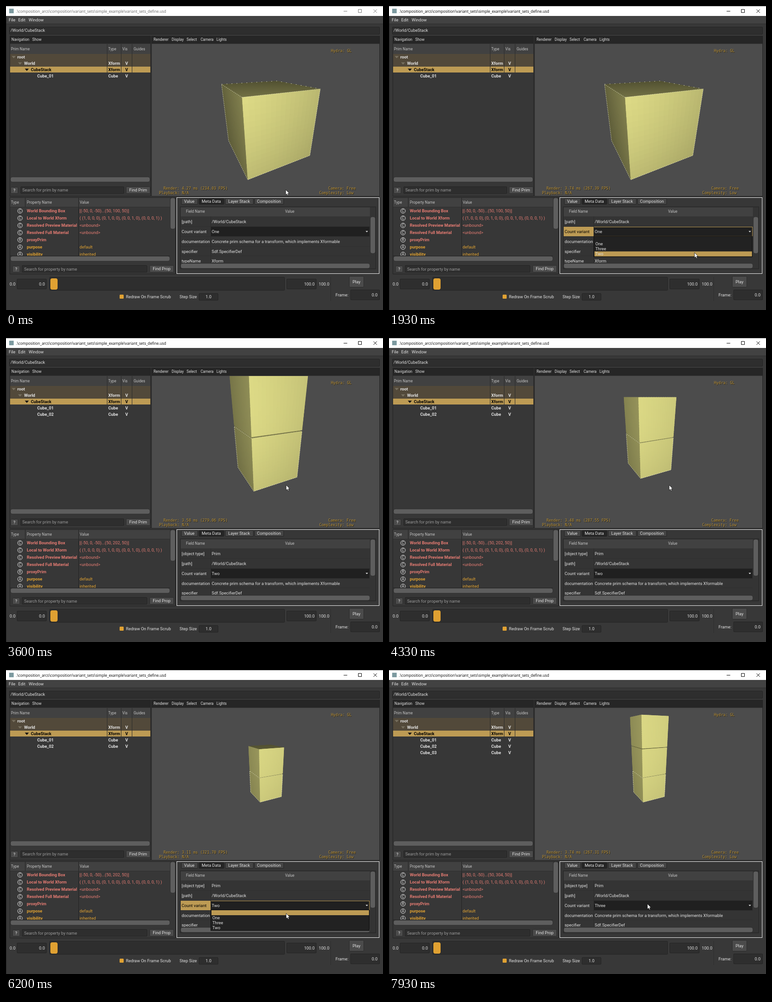
Write an HTML page with a canvas that moves like this. It is 833 by 672 pixels and loops after 8000 ms.

```html
<!DOCTYPE html>
<html lang="en">
<head>
<meta charset="utf-8">
<title>Variant sets</title>
<style>
  html, body { margin: 0; width: 833px; height: 672px; overflow: hidden; background: #383838; }
  svg, canvas { position: absolute; left: 0; top: 0; }
  canvas { left: 322px; top: 84px; }
  text { font: 9.3px Roboto, sans-serif; fill: #e3e3e3; white-space: pre; }
  .small { font-size: 8.25px; }
  .head { font-size: 8.25px; fill: #c4c4c4; }
  .bold { font-weight: 700; }
  .dim { fill: #9a9a9a; }
  .red { fill: #e67c73; }
  .gold { fill: #dfa131; }
  .black { fill: #000; }
  .hud { font: 8.42px "DejaVu Sans Mono", monospace; fill: #bf963c; }
  .shade { fill: #1d1a10; }
  .title { font: 8.3px "Open Sans", sans-serif; fill: #000; }
  .inactive { fill: #666; }
</style>
</head>
<body>
<svg id="base" width="833" height="672"></svg>
<canvas id="view" width="503" height="336"></canvas>
<svg id="live" width="833" height="672"></svg>
<script>
const TICK = 1000 / 15, TICKS = 120;
const GOLD = '#bd9b54', FIELD = '#2e2e2e', DARK = '#262626', LINE = '#222';

// ---------- SVG helpers ----------
const rect = (x, y, w, h, fill, rx = 0, extra = '') =>
  `<rect x="${x}" y="${y}" width="${w}" height="${h}" fill="${fill}" rx="${rx}" ${extra}/>`;
const path = (d, stroke, width = 1, fill = 'none') =>
  `<path d="${d}" stroke="${stroke}" stroke-width="${width}" fill="${fill}"/>`;
// y is the vertical middle of the line of text
const text = (x, y, s, cls = '', anchor = 'start') =>
  `<text x="${x}" y="${y + 3.3}" class="${cls}" text-anchor="${anchor}">${s}</text>`;
const field = (x, y, w, h) => rect(x + .5, y + .5, w - 1, h - 1, FIELD, 1.5, 'stroke="#242424"');
const button = (x, y, w, h, s) =>
  rect(x + .5, y + .5, w - 1, h - 1, '#4b4b4b', 2, 'stroke="#2a2a2a"') + text(x + w / 2, y + h / 2, s, '', 'middle');
const bar = (x, y, w, h) => rect(x, y, w, h, '#5e5e5e', 4, 'stroke="#2b2b2b" stroke-width=".8"');
const panel = (x, y, w, h, stroke = LINE) => rect(x + .5, y + .5, w - 1, h - 1, '#373737', 0, `stroke="${stroke}"`);
const vline = (x, y0, y1, color = LINE) => path(`M${x + .5} ${y0}V${y1}`, color);
const hline = (x0, x1, y, color = LINE) => path(`M${x0} ${y + .5}H${x1}`, color);
const labels = (y, cls, pairs) => pairs.map(([x, s]) => text(x, y, s, cls)).join('');

function drawBase() {
  const parts = [
    rect(0, 0, 833, 672, '#383838'),
    rect(0, 0, 833, 22, '#fff'), rect(0, 0, 833, 1, '#8a8a8a'),
    rect(7, 6, 10, 10, '#7d9aa0'),
    rect(0, 22, 833, 18, '#424242'), hline(0, 833, 39, '#2c2c2c'),
    labels(31, '', [[6, 'File'], [27, 'Edit'], [50, 'Window']]),
    field(7, 46, 819, 17), text(10, 54, '/World/CubeStack'),

    // prim browser
    panel(8, 66, 312, 355), rect(9, 67, 310, 16, DARK),
    labels(73.5, 'small', [[12, 'Navigation'], [58, 'Show']]),
    rect(9, 84, 310, 22, '#414141'),
    labels(95, 'head', [[11, 'Prim Name'], [226, 'Type'], [257, 'Vis'], [282, 'Guides']]),
    rect(9, 106, 310, 28, '#52493a'), rect(9, 134, 310, 13, GOLD),
    [223, 254, 278].map(x => vline(x, 84, 147, '#2b2b2b')).join(''),
    [[17, 113], [31, 127], [46, 141]].map(([x, y], i) =>
      path(`M${x - 4.5} ${y - 2.5}h9l-4.5 5z`, 'none', 0, i < 2 ? '#77705f' : '#111')).join(''),
    text(25, 113, 'root', 'bold'), text(40, 127, 'World', 'bold'), text(55, 141, 'CubeStack', 'bold black'),
    text(226, 127, 'Xform', 'bold'), text(226, 141, 'Xform', 'bold black'),
    text(263.5, 127, 'V', 'bold'), text(263.5, 141, 'V', 'bold black'),
    bar(10, 378, 308, 11),
    button(10, 400, 17, 15, '?'), field(32, 399, 229, 16), text(36, 407, 'Search for prim by name', 'dim'),
    button(265, 399, 54, 16, 'Find Prim'),

    // viewport frame
    panel(321, 66, 505, 355), rect(322, 67, 503, 16, DARK),
    labels(73.5, 'small', [[326, 'Renderer'], [366, 'Display'], [399, 'Select'], [430, 'Camera'], [465, 'Lights']]),

    // property browser
    panel(8, 423, 367, 170), rect(9, 424, 353, 20, '#414141'),
    labels(433.5, 'head', [[11, 'Type'], [46, 'Property Name'], [163, 'Value']]),
    vline(42, 424, 444), vline(160, 424, 552), hline(9, 362, 444, '#2e2e2e'),
    '<clipPath id="props"><rect x="9" y="445" width="353" height="107"/></clipPath><g clip-path="url(#props)">',
    [['C', 'World Bounding Box', ''], ['C', 'Local to World Xform', '( (1, 0, 0, 0), (0, 1, 0, 0), (0, 0, 1, 0), (0, 0, 0, 1) )'],
     ['C', 'Resolved Preview Material', '&lt;unbound&gt;'], ['C', 'Resolved Full Material', '&lt;unbound&gt;'],
     ['R', 'proxyPrim', ''], ['A', 'purpose', 'default'], ['A', 'visibility', 'inherited']].map(([kind, name, value], i) => {
      const y = 453 + 16 * i, color = kind === 'A' ? 'gold' : 'red';
      return `<circle cx="31" cy="${y}" r="5.2" fill="none" stroke="#ddd"/>` + text(31, y - .3, kind, 'small', 'middle')
        + text(46, y, name, 'bold ' + color) + text(162.5, y, value, color);
    }).join(''), '</g>',
    bar(10, 553, 352, 11), bar(363, 424, 11, 69), hline(9, 362, 552),
    button(14, 574, 17, 15, '?'), field(35, 573, 277, 16), text(40, 581.5, 'Search for property by name', 'dim'),
    button(317, 573, 54, 16, 'Find Prop'),

    // metadata panel
    panel(377, 423, 448, 169, '#f2f2f2'),
    [[387, 36, 'Value'], [426, 55, 'Meta Data'], [484, 62, 'Layer Stack'], [549, 64, 'Composition']].map(([x, w, s]) =>
      rect(x + .5, 425.5, w, 13, s === 'Meta Data' ? '#252525' : '#454545', 1.5, 'stroke="#242424"')
      + text(x + w / 2, 432, s, '', 'middle')).join(''),
    rect(385, 444, 432, 137, '#343434', 0, `stroke="${LINE}"`), rect(386, 445, 418, 20, '#414141'),
    text(418.5, 454, 'Field Name', 'head', 'middle'), text(627, 454, 'Value', 'head', 'middle'),
    bar(386, 569, 418, 11),

    // timeline
    text(8, 614.5, '0.0'), field(24, 603, 66, 23), text(86, 614.5, '0.0', '', 'end'),
    field(96, 599, 520, 30), rect(97.5, 601.5, 17, 26, '#e0a132', 4.5, 'stroke="#2a2a2a"'),
    field(620, 603, 66, 23), text(682, 614.5, '100.0', '', 'end'), text(691, 614.5, '100.0'),
    vline(717, 599, 652, '#2f2f2f'),
    button(758, 597, 33, 25, 'Play'), text(728, 638.5, 'Frame:'), field(761, 627, 65, 23), text(821, 638.5, '0.0', '', 'end'),
    rect(251, 638, 9, 9, '#e0a132', 1.5), text(265, 643, 'Redraw On Frame Scrub'),
    text(383.5, 643, 'Step Size'), field(426, 635, 43, 16), text(447.5, 643, '1.0', '', 'middle'),
    vline(0, 22, 672, '#222')
  ];
  document.getElementById('base').innerHTML = parts.join('');
}

// ---------- timeline, in ticks ----------
const cursorKeys = [[0, 618, 406], [9, 718, 502], [20, 718, 502], [29, 675, 545], [42, 675, 545], [48, 619, 325],
  [72, 619, 325], [79, 619, 538], [82, 619, 522], [87, 619, 522], [93, 619, 538], [97, 571, 556],
  [114, 571, 556], [119, 571, 517]];
const zoomTicks = [50, 52, 53, 55, 56, 65, 66, 67, 68];
const fpsKeys = [[0, 234.03], [15, 267.39], [38, 260.5], [50, 258.12], [52, 271.44], [53, 279.06], [55, 264.9],
  [56, 282.37], [65, 287.55], [66, 301.2], [67, 294.63], [68, 321.7], [105, 267.31]];

function cursorAt(tick) {
  const i = Math.max(1, cursorKeys.findIndex(k => k[0] >= tick));
  const [t0, x0, y0] = cursorKeys[i - 1], [t1, x1, y1] = cursorKeys[i];
  const u = (tick - t0) / (t1 - t0), e = u * u * (3 - 2 * u);
  return { x: Math.round(x0 + (x1 - x0) * e), y: Math.round(y0 + (y1 - y0) * e) };
}

function stateAt(tick) {
  return {
    count: tick < 38 ? 1 : tick < 105 ? 2 : 3,
    fps: fpsKeys.filter(k => k[0] <= tick).pop()[1],
    cursor: cursorAt(tick),
    active: tick >= 15,
    distance: 201 * 1.12 ** zoomTicks.filter(t => t <= tick).length,
    focused: tick >= 15 && tick < 38 || tick >= 88 && tick < 105,
    open: tick >= 16 && tick < 38 || tick >= 88 && tick < 105
  };
}

// ---------- viewport ----------
const ctx = document.getElementById('view').getContext('2d');
const FOCAL = 291, SIN = Math.sin(Math.PI / 8), COS = Math.cos(Math.PI / 8);
const corner = deg => [70.71 * Math.sin(deg * Math.PI / 180), 70.71 * Math.cos(deg * Math.PI / 180)];
const [front, right, left, back] = [-17.6, 72.4, -107.6, 162.4].map(corner);

function drawView({ count, distance }) {
  const eye = [0, 50 + distance * SIN, distance * COS];
  const project = ([x, y, z]) => {
    const h = y - 50, depth = distance - z * COS - h * SIN;
    return [251.5 + FOCAL * x / depth, 167.5 - FOCAL * (h * COS - z * SIN) / depth];
  };
  const trace = points => {
    ctx.beginPath();
    points.forEach(p => ctx.lineTo(...project(p)));
  };
  const at = ([x, z], y) => [x, y, z];

  // shaded by a light at the eye, in small patches that overlap inside the clipped face
  function face(o, a, b, normal) {
    const n = 16;
    const point = (u, v) => o.map((c, i) => c + (a[i] - c) * u / n + (b[i] - c) * v / n);
    const quad = (u, v, size) => {
      trace([point(u, v), point(u + size, v), point(u + size, v + size), point(u, v + size)]);
      ctx.closePath();
    };
    ctx.save();
    quad(0, 0, n);
    ctx.clip();
    for (let u = 0; u < n; u++) for (let v = 0; v < n; v++) {
      const ray = point(u + .5, v + .5).map((c, i) => eye[i] - c);
      const lit = ray.reduce((s, c, i) => s + c * normal[i], 0) / Math.hypot(...ray);
      const k = Math.max(0, lit) ** (1 / 2.2);
      quad(u, v, 1);
      ctx.fillStyle = ctx.strokeStyle = `rgb(${228 * k},${225 * k},${138 * k})`;
      ctx.fill();
      ctx.stroke();
    }
    ctx.restore();
  }
  const side = (p, y0, y1) => face(at(front, y0), at(p, y0), at(front, y1),
    [(front[0] + p[0]) / 100, 0, (front[1] + p[1]) / 100]);

  ctx.setLineDash([]);
  ctx.lineWidth = 2;
  ctx.lineJoin = 'round';
  ctx.fillStyle = '#4c4c4c';
  ctx.fillRect(0, 0, 503, 336);
  for (let i = 0; i < count; i++) {
    const y0 = 102 * i, y1 = y0 + 100;
    if (eye[1] > y1) face(at(front, y1), at(right, y1), at(left, y1), [0, 1, 0]);
    side(left, y0, y1);
    side(right, y0, y1);
  }

  const dashed = (points, alpha, dash = [2, 2]) => {
    trace(points);
    ctx.setLineDash(dash);
    ctx.lineWidth = 1;
    ctx.strokeStyle = `rgba(255,255,225,${alpha})`;
    ctx.stroke();
  };
  dashed([at(front, 100), at(left, 100), at(left, 0), at(front, 0), at(right, 0), at(right, 100)], .7);
  dashed([at(front, 100), at(right, 100)], count > 1 ? .2 : .5);
  if (count === 1) dashed([at(left, 100), at(back, 100), at(right, 100)], .7, [2, 9]);
}

// ---------- changing parts of the interface ----------
function titleBar(active) {
  const name = '.\\composition_arcs\\composition\\variant_sets\\simple_example\\variant_sets_define.usd';
  return text(22, 11.3, name, active ? 'title' : 'title inactive')
    + path('M746 11.5h8M778.5 7.5h7v7h-7zM812 7.5l7.5 7.5M819.5 7.5l-7.5 7.5', active ? '#000' : '#777');
}

function hud(fps) {
  const lines = [[718, 99, 'Hydra: GL'], [348, 402.5, `Render: ${(1000 / fps).toFixed(2)} ms (${fps.toFixed(2)} FPS)`],
    [338, 413, 'Playback: N/A'], [712, 402.5, 'Camera: Free'], [692, 413, 'Complexity: Low']];
  return lines.map(([x, y, s]) => text(x + .8, y + .8, s, 'hud shade') + text(x, y, s, 'hud')).join('');
}

function metadata({ count, focused }) {
  const variant = ['One', 'Two', 'Three'][count - 1], scrolled = count === 1;
  const rows = [['[object type]', 'Prim'], ['[path]', '/World/CubeStack'], ['Count variant', variant],
    ['documentation', 'Concrete prim schema for a transform, which implements Xformable'],
    ['specifier', 'Sdf.SpecifierDef'], ['typeName', 'Xform']].slice(scrolled ? 1 : 0);
  const body = rows.map(([name, value], i) => {
    const y = 477 + 21.75 * i, top = Math.round(y - 11), combo = name === 'Count variant';
    const lit = combo && focused;
    return (lit ? rect(386, top, 66, 22, GOLD) : '')
      + (combo ? rect(453, top, 350, 21, '#202020') + path(`M794.5 ${y - 1.5}h5.5l-2.75 3z`, 'none', 0, '#ddd') : '')
      + (lit ? rect(452.5, top + .5, 350.5, 20.5, 'none', 0, `stroke="${GOLD}"`) : '')
      + text(388, y, name, lit ? 'black' : '') + text(454.5, y, value)
      + hline(386, 804, top + 21, '#2f2f2f');
  }).join('');
  return '<clipPath id="meta"><rect x="386" y="465" width="418" height="103"/></clipPath>'
    + `<g clip-path="url(#meta)">${body}${vline(452, 465, 568, '#2b2b2b')}</g>` + bar(805, scrolled ? 466 : 445, 11, 81);
}

function popup({ count, cursor }) {
  const top = count === 1 ? 509.5 : 531, items = ['', 'One', 'Three', 'Two'];
  const current = count === 1 ? 1 : 3;
  const hover = cursor.y < top ? current : Math.min(3, Math.floor((cursor.y - top) / 11));
  return rect(452.5, top - .5, 350, 45.5, '#222', 0, 'stroke="#0c0c0c"')
    + rect(454, top + 11 * hover, 348, 11, GOLD)
    + items.map((s, i) => text(456, top + 11 * i + 5.5, s)).join('');
}

const pointer = ({ x, y }) => `<path transform="translate(${x} ${y})" fill="#fff" stroke="#111" stroke-width=".8"
  d="M0 0V11.5L2.6 9.2 4.4 13 6.3 12.2 4.6 8.4H8Z"/>`;

function drawLive(state) {
  let tree = '';
  for (let i = 0; i < state.count; i++) {
    const y = 154.7 + 13.8 * i;
    tree += text(69, y, 'Cube_0' + (i + 1), 'bold') + text(226, y, 'Cube', 'bold') + text(263.5, y, 'V', 'bold');
  }
  document.getElementById('live').innerHTML = titleBar(state.active) + tree
    + text(162.5, 453, `[(-50, 0, -50)...(50, ${102 * state.count - 2}, 50)]`, 'red')
    + hud(state.fps) + metadata(state) + (state.open ? popup(state) : '') + pointer(state.cursor);
}

// ---------- playback ----------
const start = performance.now();
let shownTick = -1, shownView = '';

function play() {
  // ticks fall on times rounded to 10 ms, hence the small lead
  const tick = Math.floor((performance.now() - start + 5) / TICK) % TICKS;
  if (tick !== shownTick) {
    const state = stateAt(tick), view = state.count + '/' + state.distance;
    if (view !== shownView) drawView(state);
    drawLive(state);
    shownTick = tick;
    shownView = view;
  }
  requestAnimationFrame(play);
}
drawBase();
play();
</script>
</body>
</html>
```
